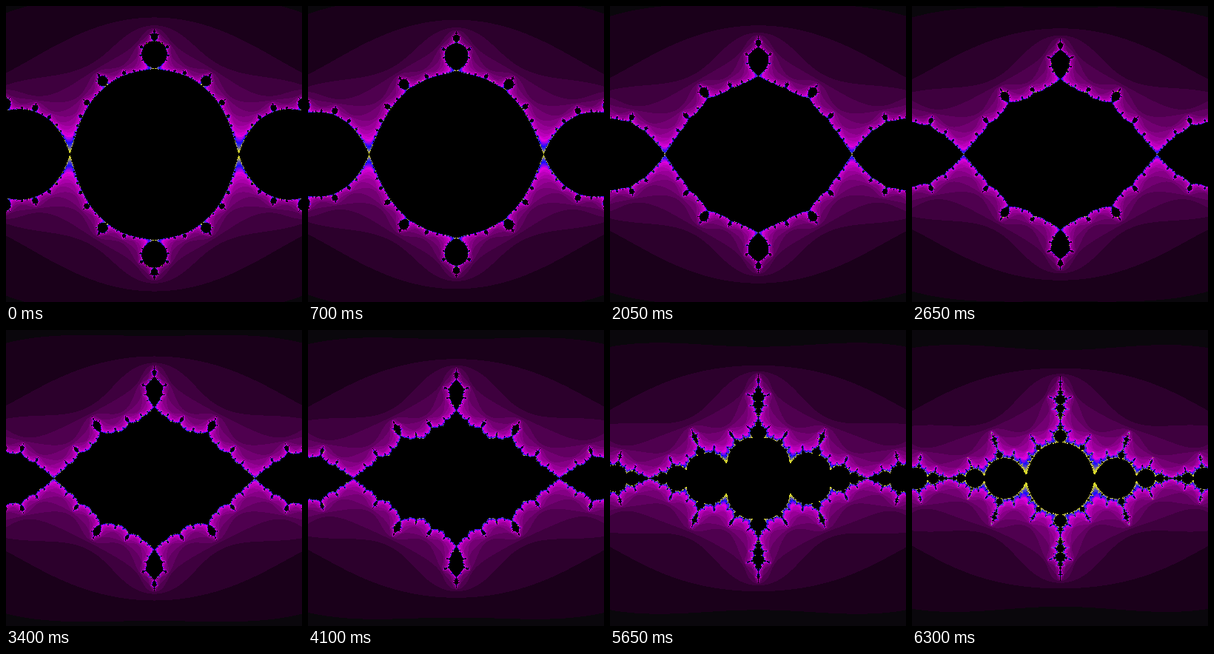
Animation of 400 by 400 pixels, one loop 6.35 s. Source, as an HTML page with a canvas:

```html
<!DOCTYPE html>
<html lang="en">
<head>
<meta charset="utf-8">
<title>Julia sweep</title>
<style>
  html, body { margin: 0; width: 100%; height: 100%; overflow: hidden; background: #000; }
  canvas { display: block; width: 400px; height: 400px; }
</style>
</head>
<body>
<canvas id="stage" width="400" height="400"></canvas>
<script>
const SIZE = 400, MID = 200, SCALE = 204;
const LOOP = 6350, STEP = 50;
const MAX_ITER = 40;

// Sweep of the real constant: [ms, c]
const SWEEP = [[0, -0.872], [1400, -0.953], [3400, -1.109], [6300, -1.278]];

// Colour stops: [iterations, r, g, b]
const STOPS = [
  [0, 10, 7, 12],
  [1, 26, 0, 26],
  [12, 222, 0, 222],
  [16, 24, 12, 255],
  [27, 212, 212, 45],
  [MAX_ITER, 225, 225, 40]
];

const ctx = document.getElementById('stage').getContext('2d');
const image = ctx.createImageData(SIZE, SIZE);
const pixels = new Uint32Array(image.data.buffer);

// Linear interpolation in rows of [position, ...values]
function sample(rows, at) {
  let i = 1;
  while (i < rows.length - 1 && rows[i][0] < at) i++;
  const a = rows[i - 1], b = rows[i];
  const k = (at - a[0]) / (b[0] - a[0]);
  return a.slice(1).map((v, j) => v + (b[j + 1] - v) * k);
}

function pack(rgb) {
  const [r, g, b] = rgb.map(Math.round);
  return (255 << 24 | b << 16 | g << 8 | r) >>> 0;
}

const palette = Array.from({ length: MAX_ITER }, (_, n) => pack(sample(STOPS, n)));
palette.push(pack([0, 0, 0]));

// Completed iterations of z^2 + c before |z| passes 2
function escape(x, y, c) {
  for (let n = 0; n < MAX_ITER; n++) {
    const nx = x * x - y * y + c;
    y = 2 * x * y;
    x = nx;
    if (x * x + y * y > 4) return n;
  }
  return MAX_ITER;
}

// The set is symmetric in both axes, so one quadrant is enough
function draw(c) {
  for (let j = 0; j <= MID; j++) {
    for (let i = 0; i <= MID; i++) {
      const color = palette[escape(i / SCALE, j / SCALE, c)];
      const left = MID - i, right = MID + i;
      const top = (MID - j) * SIZE, bottom = (MID + j) * SIZE;
      pixels[top + left] = color;
      if (i < MID) pixels[top + right] = color;
      if (j < MID) {
        pixels[bottom + left] = color;
        if (i < MID) pixels[bottom + right] = color;
      }
    }
  }
  ctx.putImageData(image, 0, 0);
}

const start = performance.now();
let shown = -1;

function tick() {
  const t = (performance.now() - start) % LOOP;
  const step = Math.floor(t / STEP);
  if (step !== shown) {
    shown = step;
    draw(sample(SWEEP, step * STEP)[0]);
  }
  requestAnimationFrame(tick);
}
tick();
</script>
</body>
</html>
```
